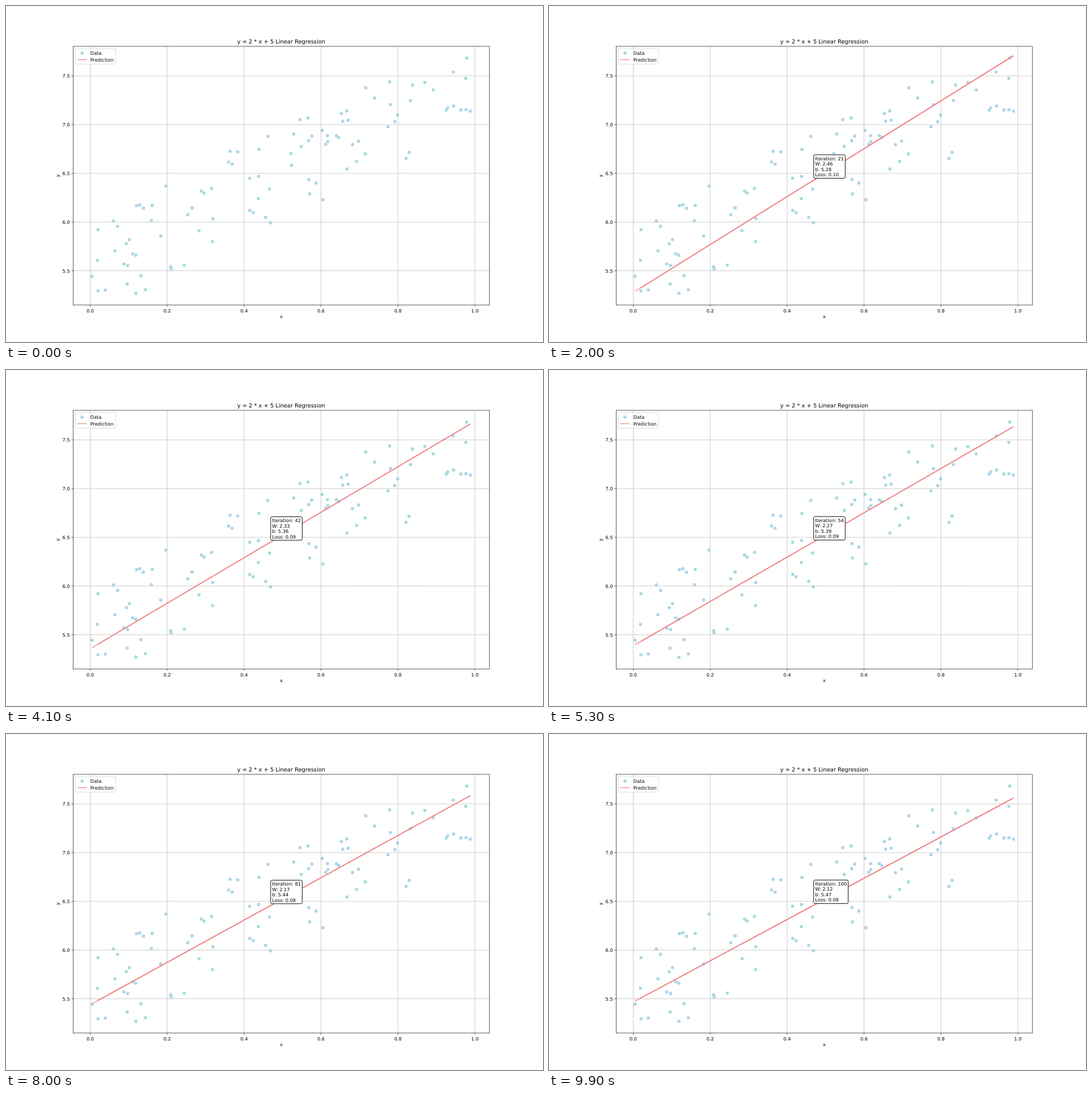
Write an HTML page with a canvas that moves like this. It is 947 px wide and 592 px high and loops after 10000 ms.

```html
<!DOCTYPE html>
<html lang="en">
<head>
<meta charset="utf-8">
<title>Linear Regression</title>
<style>
html, body { margin: 0; width: 100%; height: 100%; overflow: hidden; background: #fff; }
canvas { display: block; }
</style>
</head>
<body>
<canvas id="stage" width="947" height="592"></canvas>
<script>
const ctx = document.getElementById('stage').getContext('2d');
const W = 947, H = 592, PT = H / 720, EM = 10 * PT;
const LEFT = W * 0.125, RIGHT = W * 0.9, TOP = H * 0.12, BOTTOM = H * 0.89;
const STEP = 100, STEPS = 100, RATE = 0.1;
const CORAL = '#f08080', BLUE = '#add8e6';

// Mersenne Twister, giving 53-bit doubles (enough for the first 300)
function twister(seed) {
  const mt = [seed >>> 0];
  for (let i = 1; i < 624; i++) {
    const p = mt[i - 1] ^ (mt[i - 1] >>> 30);
    mt[i] = (Math.imul(1812433253, p) + i) >>> 0;
  }
  let k = 0;
  const next = () => {
    let y = (mt[k] & 0x80000000) | (mt[k + 1] & 0x7fffffff);
    y = mt[k] = mt[(k + 397) % 624] ^ (y >>> 1) ^ (y & 1 ? 0x9908b0df : 0);
    k++;
    y ^= y >>> 11;
    y ^= (y << 7) & 0x9d2c5680;
    y ^= (y << 15) & 0xefc60000;
    return (y ^ (y >>> 18)) >>> 0;
  };
  return () => {
    const a = next() >>> 5, b = next() >>> 6;
    return (a * 67108864 + b) / 9007199254740992;
  };
}

const random = twister(0);
const xs = Array.from({ length: 100 }, random);
const ys = xs.map(x => 2 * x + 5 + random());
const mean = list => list.reduce((a, b) => a + b, 0) / list.length;
const meanX = mean(xs);

// Gradient descent from zero; the loss is the one before each step
const fits = [];
for (let i = 0, w = 0, b = 0; i < STEPS; i++) {
  const err = xs.map((x, j) => w * x + b - ys[j]);
  const loss = mean(err.map(e => e * e));
  w -= 2 * RATE * mean(err.map((e, j) => e * xs[j]));
  b -= 2 * RATE * mean(err);
  fits.push({ w, b, loss });
}

// Data to stage, with a 5% margin around the data
function axis(data, from, to) {
  const lo = Math.min(...data), hi = Math.max(...data), pad = (hi - lo) * 0.05;
  return v => from + (v - lo + pad) / (hi - lo + 2 * pad) * (to - from);
}
const px = axis(xs, LEFT, RIGHT), py = axis(ys, BOTTOM, TOP);
const minX = Math.min(...xs), maxX = Math.max(...xs);

function text(str, x, y, align = 'left', size = EM) {
  ctx.font = `${size}px "DejaVu Sans", sans-serif`;
  ctx.textAlign = align;
  ctx.fillStyle = '#000';
  ctx.fillText(str, x, y);
}

function line(x1, y1, x2, y2, color, width) {
  ctx.strokeStyle = color;
  ctx.lineWidth = width;
  ctx.beginPath();
  ctx.moveTo(x1, y1);
  ctx.lineTo(x2, y2);
  ctx.stroke();
}

function dot(x, y) {
  ctx.fillStyle = BLUE;
  ctx.beginPath();
  ctx.arc(x, y, 2.9, 0, 7);
  ctx.fill();
}

function panel(x, y, w, h, r, fill, edge, width) {
  ctx.beginPath();
  ctx.roundRect(x, y, w, h, r);
  ctx.fillStyle = fill;
  ctx.fill();
  ctx.strokeStyle = edge;
  ctx.lineWidth = width;
  ctx.stroke();
}

function drawGrid() {
  const thin = 0.8 * PT, tick = 3.5 * PT;
  for (let i = 0; i <= 5; i++) {
    const x = px(i / 5);
    line(x, TOP, x, BOTTOM, '#b0b0b0', thin);
    line(x, BOTTOM, x, BOTTOM + tick, '#000', thin);
    text((i / 5).toFixed(1), x, 539.9, 'center');
  }
  for (let v = 5.5; v <= 7.5; v += 0.5) {
    const y = py(v);
    line(LEFT, y, RIGHT, y, '#b0b0b0', thin);
    line(LEFT - tick, y, LEFT, y, '#000', thin);
    text(v.toFixed(1), LEFT - 2 * tick, y + 3.1, 'right');
  }
}

function drawFit({ w, b, loss }, n) {
  const at = x => py(w * x + b);
  ctx.save();
  ctx.beginPath();
  ctx.rect(LEFT, TOP, RIGHT - LEFT, BOTTOM - TOP);
  ctx.clip();
  line(px(minX), at(minX), px(maxX), at(maxX), CORAL, 1.5 * PT);
  line(px(0.019), at(0.019), px(maxX), at(maxX), CORAL, 1.85);

  const rows = [`Iteration: ${n}`, `W: ${w.toFixed(2)}`, `b: ${b.toFixed(2)}`, `Loss: ${loss.toFixed(2)}`];
  const x = px(meanX), base = at(meanX) - 5.1, pad = 0.3 * EM;
  ctx.font = `${EM}px "DejaVu Sans", sans-serif`;
  const width = ctx.measureText(rows[0]).width;
  panel(x - pad, base - 38, width + 2 * pad, 41.4, pad, '#fff', '#000', 0.95);
  rows.forEach((row, i) => text(row, x, base - (3 - i) * 9.5));
  ctx.restore();
}

function drawFrame() {
  ctx.strokeStyle = '#000';
  ctx.lineWidth = 0.8 * PT;
  ctx.strokeRect(LEFT, TOP, RIGHT - LEFT, BOTTOM - TOP);
  text('y = 2 * x + 5 Linear Regression', (LEFT + RIGHT) / 2, 66.1, 'center', 12 * PT);
  text('x', (LEFT + RIGHT) / 2, 550.4, 'center');
  ctx.save();
  ctx.translate(93.9, (TOP + BOTTOM) / 2);
  ctx.rotate(-Math.PI / 2);
  text('y', 0, 0, 'center');
  ctx.restore();
}

function drawLegend() {
  panel(122.5, 75.2, 70.9, 27.2, 0.2 * EM, 'rgba(255,255,255,.8)', 'rgba(204,204,204,.8)', PT);
  dot(134, 83);
  text('Data', 148.8, 85.9);
  line(125.8, 94.6, 142.3, 94.6, CORAL, 1.5 * PT);
  text('Prediction', 148.8, 97.5);
}

function draw() {
  const i = Math.floor(performance.now() / STEP) % STEPS;
  ctx.textRendering = 'geometricPrecision';
  ctx.fillStyle = '#fff';
  ctx.fillRect(0, 0, W, H);
  xs.forEach((x, j) => dot(px(x), py(ys[j])));
  drawGrid();
  drawFit(fits[i], i + 1);
  drawFrame();
  drawLegend();
  requestAnimationFrame(draw);
}
draw();
</script>
</body>
</html>
```
